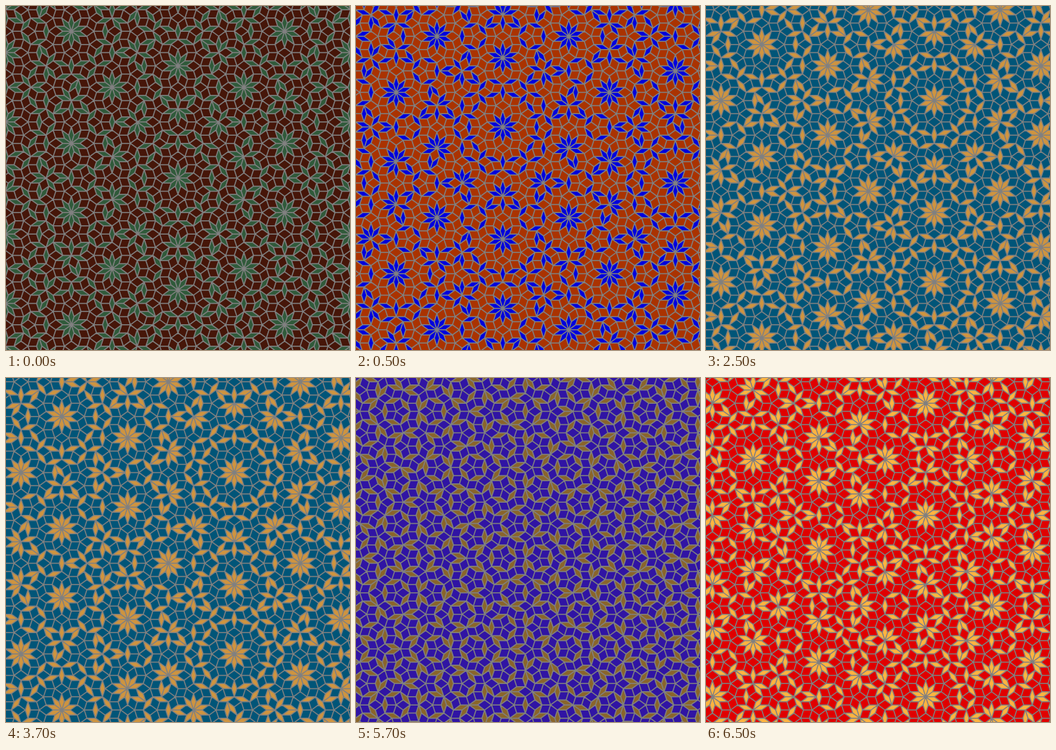
Recreate the animation shown at these times as an HTML page with a canvas. Size 480x480 px, loop 8 s.

```html
<!DOCTYPE html>
<html>
<head>
<meta charset="utf-8">
<style>
html, body { margin: 0; height: 100%; overflow: hidden; background: #461609; }
canvas { display: block; width: 480px; height: 480px; }
</style>
</head>
<body>
<canvas width="480" height="480"></canvas>
<script>
// Rhombus tilings built as duals of a pentagrid: five families of parallel lines.
const SIZE = 480, MID = SIZE / 2, EDGE = 12, REACH = 14, LOOP = 8000;
const ctx = document.querySelector('canvas').getContext('2d');
const dirs = [0, 1, 2, 3, 4].map(k => [Math.cos(k * 0.4 * Math.PI), Math.sin(k * 0.4 * Math.PI)]);
const dot = (a, b) => a[0] * b[0] + a[1] * b[1];

// shift: common line offset; skew: offset that changes the local pattern
const scenes = [
  { start: 0,    fat: '#461609', thin: '#305a3a', shift: 0.5, skew: [0, 0] },
  { start: 500,  fat: '#aa3300', thin: '#0000dd', shift: 0.5, skew: [0.172, -0.388] },
  { start: 2500, fat: '#005578', thin: '#ce9440', shift: 0.5, skew: [0.381, -0.133] },
  { start: 4500, fat: '#3014a4', thin: '#8a652a', shift: 0.2, skew: [0.13, 0.21] },
  { start: 6500, fat: '#e00000', thin: '#ffb340', shift: 0.329, skew: [-0.0244, 0.0291] }
];

function buildTiles({ shift, skew }) {
  const offsets = dirs.map((_, k) => shift + dot(skew, dirs[2 * k % 5]));
  const paths = { fat: new Path2D(), thin: new Path2D(), all: new Path2D() };
  for (let j = 0; j < 4; j++) for (let k = j + 1; k < 5; k++) {
    const a = dirs[j], b = dirs[k], det = a[0] * b[1] - a[1] * b[0];
    const kind = k - j === 2 || k - j === 3 ? 'thin' : 'fat';
    for (let m = -REACH; m <= REACH; m++) for (let n = -REACH; n <= REACH; n++) {
      const p = m - offsets[j], q = n - offsets[k];
      const cross = [(p * b[1] - q * a[1]) / det, (q * a[0] - p * b[0]) / det];
      let x = MID, y = MID;
      dirs.forEach((d, i) => {
        const cell = i === j ? m - 1 : i === k ? n - 1 : Math.floor(dot(cross, d) + offsets[i]);
        x += EDGE * cell * d[0];
        y += EDGE * cell * d[1];
      });
      if (Math.max(Math.abs(x - MID), Math.abs(y - MID)) > MID + 2 * EDGE) continue;
      for (const path of [paths[kind], paths.all]) {
        path.moveTo(x, y);
        path.lineTo(x + EDGE * a[0], y + EDGE * a[1]);
        path.lineTo(x + EDGE * (a[0] + b[0]), y + EDGE * (a[1] + b[1]));
        path.lineTo(x + EDGE * b[0], y + EDGE * b[1]);
        path.closePath();
      }
    }
  }
  return paths;
}

for (const scene of scenes) scene.paths = buildTiles(scene);

function draw({ fat, thin, paths }) {
  ctx.fillStyle = fat;
  ctx.fillRect(0, 0, SIZE, SIZE);
  ctx.fillStyle = thin;
  ctx.fill(paths.thin);
  ctx.strokeStyle = '#808080';
  ctx.lineWidth = 1.5;
  ctx.lineJoin = 'round';
  ctx.stroke(paths.all);
}

let shown;
const began = performance.now();
function tick() {
  const time = (performance.now() - began) % LOOP;
  const scene = scenes.filter(s => s.start <= time).pop();
  if (scene !== shown) draw(shown = scene);
  requestAnimationFrame(tick);
}
tick();
</script>
</body>
</html>
```
